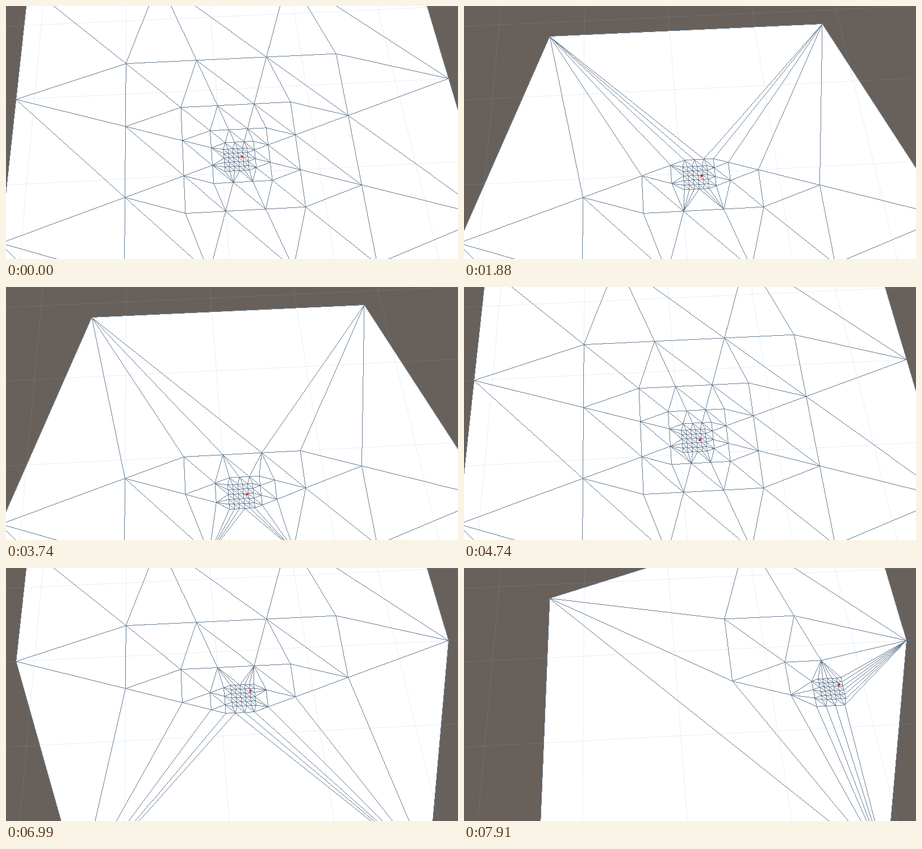
Write a matplotlib script that moves like this. It is 796 px wide and 446 px high and loops after 7.99 s.

```python
import numpy as np
import matplotlib.pyplot as plt
from matplotlib.animation import FuncAnimation
from matplotlib.collections import LineCollection, PolyCollection

W, H, DPI = 796, 446, 100
PX = 72 / DPI                      # one pixel in points
FRAMES, INTERVAL = 235, 34
START, TICK = 1030, 77.2           # the viewer moves in discrete ticks (ms)

BROWN, RED = "#68605a", "#ff0000"
WIRE = (106, 127, 149, 255)
GRID = (0.50, 0.70, 0.88, 0.20)

ROOT, FINEST = 32, 0.25            # largest and smallest quadtree cell

# four ground points and where the camera shows them
CORNERS = [(-8, -8, 150.5, 53), (8, -8, 630.5, 31),
           (-6, 2, 209, 337), (6, 2, 626, 315)]

# viewer path: time in ms, ground position; down, back up, then right
PATH = np.array([
    (960, 0.05, 0.08), (1880, 0.05, 1.16), (3100, 0.05, 3.5),
    (3420, 0.05, 3.5), (3740, 0.05, 3.15), (4740, 0.05, 0.18),
    (5740, 0.05, -1.5), (6910, 0.05, -1.5), (7360, 4.2, -1.5),
    (7900, 7.67, -1.5),
])


def fit_camera(corners):
    rows, rhs = [], []
    for u, v, x, y in corners:
        rows.append([u, v, 1, 0, 0, 0, -u * x, -v * x])
        rows.append([0, 0, 0, u, v, 1, -u * y, -v * y])
        rhs += [x, y]
    return np.append(np.linalg.solve(rows, rhs), 1).reshape(3, 3)


CAMERA = fit_camera(CORNERS)


def project(points):
    p = np.column_stack([points, np.ones(len(points))]) @ CAMERA.T
    return p[:, :2] / p[:, 2:] + 0.5


def viewer(frame):
    ticks = np.floor(((frame + 1) * INTERVAL - START) / TICK)
    t = START + ticks * TICK
    return [np.interp(t, PATH[:, 0], PATH[:, axis]) for axis in (1, 2)]


def leaves(box, u=0.0, v=0.0, size=ROOT):
    """Quadtree leaves (centre, size), refined where the box touches a cell."""
    u0, u1, v0, v1 = box
    half = size / 2
    touched = u0 < u + half and u1 > u - half and v0 < v + half and v1 > v - half
    if size <= FINEST or not touched:
        return [(u, v, size)]
    q = size / 4
    return [leaf for dv in (-q, q) for du in (-q, q)
            for leaf in leaves(box, u + du, v + dv, half)]


def build_mesh(u, v):
    """Dual mesh: join the centres of the leaves that meet at each corner."""
    cells = np.array(leaves((u - 0.69, u + 0.31, v - 0.3, v + 0.7)))
    n = int(ROOT / FINEST)
    owner = np.zeros((n, n), int)
    for i, (cu, cv, size) in enumerate(cells):
        span = int(size / FINEST)
        col = int((cu - size / 2 + ROOT / 2) / FINEST)
        row = int((cv - size / 2 + ROOT / 2) / FINEST)
        owner[row:row + span, col:col + span] = i

    nw, ne = owner[:-1, :-1].ravel(), owner[:-1, 1:].ravel()
    sw, se = owner[1:, :-1].ravel(), owner[1:, 1:].ravel()
    tris = np.vstack([np.column_stack([nw, ne, se]),
                      np.column_stack([nw, se, sw])])
    a, b, c = tris.T
    tris = tris[(a != b) & (b != c) & (a != c)]
    edges = np.vstack([tris[:, [0, 1]], tris[:, [1, 2]], tris[:, [2, 0]]])
    edges = np.unique(np.sort(edges, axis=1), axis=0)
    screen = project(cells[:, :2])
    return screen[tris], screen[edges]


def rasterize(segments):
    """Hard one-pixel lines on a transparent layer."""
    p, d = segments[:, 0], segments[:, 1] - segments[:, 0]
    steps = np.ceil(np.abs(d).max(axis=1)).astype(int) + 1
    which = np.repeat(np.arange(len(steps)), steps)
    first = np.repeat(np.cumsum(steps) - steps, steps)
    along = (np.arange(len(which)) - first) / np.maximum(steps[which] - 1, 1)
    x, y = np.floor(p[which] + d[which] * along[:, None]).astype(int).T
    inside = (x >= 0) & (x < W) & (y >= 0) & (y < H)
    layer = np.zeros((H, W, 4), np.uint8)
    layer[y[inside], x[inside]] = WIRE
    return layer


fig = plt.figure(figsize=(W / DPI, H / DPI), dpi=DPI, facecolor=BROWN)
ax = fig.add_axes([0, 0, 1, 1])
ax.axis("off")

wires = ax.imshow(np.zeros((H, W, 4), np.uint8), extent=(0, W, H, 0),
                  aspect="auto", interpolation="nearest", zorder=3)
faces = PolyCollection([], facecolor="white", edgecolor="white",
                       linewidth=0.5 * PX, zorder=1)
ax.add_collection(faces, autolim=False)

ground = [project(np.array([(u, -16), (u, 12)])) for u in range(-16, 15, 5)]
ground += [project(np.array([(-20, v), (20, v)])) for v in range(-14, 7, 5)]
ax.add_collection(LineCollection(ground, colors=[GRID], linewidth=PX, zorder=2),
                  autolim=False)

dot, = ax.plot([], [], "o", color=RED, markersize=4 * PX,
               markeredgewidth=0, zorder=4)
ax.set_xlim(0, W)
ax.set_ylim(H, 0)


def draw(frame):
    u, v = viewer(frame)
    triangles, edges = build_mesh(u, v)
    faces.set_verts(triangles)
    wires.set_data(rasterize(edges))
    x, y = project(np.array([(u, v)]))[0]
    dot.set_data([x], [y])
    return faces, wires, dot


anim = FuncAnimation(fig, draw, frames=FRAMES, interval=INTERVAL,
                     init_func=lambda: draw(0), repeat=True, repeat_delay=0)
plt.show()
```
